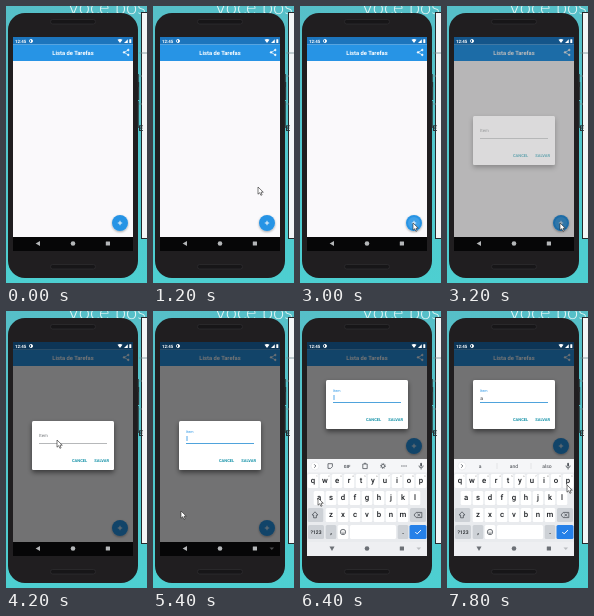
An HTML page for the animation above (8000 ms loop, 141 px wide and 277 px high).

```html
<!DOCTYPE html>
<html lang="pt">
<head>
<meta charset="utf-8">
<title>Lista de Tarefas</title>
<style>
  html, body { margin: 0; width: 100%; height: 100%; overflow: hidden; background: #54c6cd; }
  svg { display: block; width: 100vw; height: 100vh; }
  text { font-family: Roboto, "Noto Sans", sans-serif; text-rendering: geometricPrecision; }
  .mid { text-anchor: middle; }
  .line { fill: none; stroke: #50555b; stroke-width: .8; }
  .action { font-size: 4px; font-weight: 600; fill: #1592a8; }
</style>
</head>
<body>
<svg viewBox="0 0 141 277" preserveAspectRatio="none">
  <defs>
    <linearGradient id="sea" x2="0" y2="1">
      <stop offset="0" stop-color="#56bfc8"/><stop offset="1" stop-color="#4dcfd1"/>
    </linearGradient>
    <filter id="soft" x="-30%" y="-30%" width="160%" height="170%">
      <feDropShadow dx="0" dy="1" stdDeviation="1" flood-opacity=".35"/>
    </filter>
    <filter id="deep" x="-20%" y="-20%" width="140%" height="160%">
      <feDropShadow dx="0" dy="2.5" stdDeviation="2.5" flood-opacity=".5"/>
    </filter>
    <clipPath id="screen"><rect x="7" y="31" width="120" height="214"/></clipPath>
  </defs>

  <!-- Page behind the phone -->
  <rect width="141" height="277" fill="url(#sea)"/>
  <text x="61" y="7.5" font-size="20" font-weight="300" fill="#e4f6f6" style="font-family:Lato,sans-serif">Você poss</text>
  <rect x="135.5" y="6.5" width="8" height="226" fill="#f3f6f7" stroke="#25292c"/>
  <path d="M133 47h8M133 70h3M133 98h3" stroke="#748d94" stroke-width=".8"/>
  <text x="132.5" y="125" font-size="8" font-weight="700" fill="#253035">E</text>
  <path d="M132.5 76v18" stroke="#30383c" stroke-width="1.4"/>

  <!-- Phone body -->
  <rect x="2" y="7" width="130" height="265" rx="17" fill="#201e20"/>
  <path d="M132 68v13M132 95v27" stroke="#25282a" stroke-width="1.4"/>
  <g fill="#171618" stroke="#302e31" stroke-width=".7">
    <rect x="44.5" y="13.5" width="45" height="4.5" rx="2.2"/>
    <rect x="44.5" y="258.5" width="45" height="4.5" rx="2.2"/>
  </g>

  <g clip-path="url(#screen)">
    <rect x="7" y="31" width="120" height="214" fill="#faf9fb"/>
    <rect x="7" y="31" width="120" height="7.5" fill="#1c75bd"/>
    <rect x="7" y="38.5" width="120" height="16.5" fill="#2794e5"/>
    <text class="mid" x="67" y="48.6" font-size="5.8" font-weight="600" fill="#fff">Lista de Tarefas</text>
    <g fill="#fff" stroke="#fff" stroke-width=".7">
      <path d="M122.3 44l-4.2 2.4 4.2 2.5" fill="none"/>
      <circle cx="122.3" cy="44" r=".8"/><circle cx="118" cy="46.4" r=".8"/><circle cx="122.3" cy="48.9" r=".8"/>
    </g>
    <g id="fab">
      <circle cx="114" cy="217" r="8" fill="#2794e5" filter="url(#soft)"/>
      <circle id="ripple" cx="114" cy="217" r="6" fill="#fff" opacity="0"/>
      <path d="M111.8 217h4.4M114 214.8v4.4" stroke="#fff" stroke-width=".9"/>
    </g>

    <rect id="scrim" x="7" y="31" width="120" height="200" fill="#000" opacity="0"/>
    <g fill="#fff">
      <text x="9" y="37" font-size="4.4" font-weight="600">12:45</text>
      <circle cx="25" cy="35" r="1.6" fill="none" stroke="#fff" stroke-width=".8"/>
      <path d="M25 33.4a1.6 1.6 0 0 1 0 3.2zM111.5 33.8q2.5-1.7 5 0l-2.5 3.2zM118 37l3.8-3.8V37z"/>
      <rect x="123.3" y="33.2" width="2" height="3.8" rx=".3"/>
    </g>

    <g id="dialog" opacity="0">
      <rect x="26" y="110" width="82" height="49" rx="1.5" fill="#fff" filter="url(#deep)"/>
      <text id="label" x="33">Item</text>
      <text id="typed" x="33.2" y="129.7" font-size="5" fill="#303236">a</text>
      <path id="caret" d="M34 125v5" stroke="#2794e5" stroke-width=".8"/>
      <path id="rule" d="M33 132.5h68"/>
      <text class="action" x="66" y="150.5">CANCEL</text>
      <text class="action" x="88.3" y="150.5">SALVAR</text>
    </g>

    <rect id="navBar" x="7" y="231" width="120" height="14"/>
    <g id="board">
      <rect x="7" y="148" width="120" height="83" fill="#e9ebee"/>
      <rect x="7" y="148" width="120" height="13.5" fill="#f5f6f8"/>
      <circle cx="15" cy="155" r="4" fill="#fff" stroke="#d9dce0" stroke-width=".4"/>
      <path class="line" d="M14.2 153.3l1.7 1.7-1.7 1.7"/>
      <g id="tools">
        <path class="line" d="M28 152.7h4.4v3l-1.7 1.7H28zM62.8 153h4.4v4.6h-4.4zM64 152.3h2"/>
        <text class="mid" x="47" y="156.7" font-size="4.3" font-weight="700" fill="#50555b">GIF</text>
        <circle class="line" cx="83" cy="155" r="1.6"/>
        <circle class="line" cx="83" cy="155" r="2.5" stroke-dasharray="1 .96"/>
        <path d="M101.3 155h5.5" stroke="#50555b" stroke-width="1.2" stroke-dasharray="1.2 .9"/>
      </g>
      <g id="hints" class="mid" font-size="5" fill="#3e4248">
        <text x="33" y="156.7">a</text><text x="67" y="156.7">and</text><text x="100" y="156.7">also</text>
        <path d="M50 152v6M84 152v6" stroke="#d0d3d7" stroke-width=".5"/>
      </g>
      <rect x="120.2" y="151.8" width="1.8" height="3.8" rx=".9" fill="#50555b"/>
      <path class="line" d="M119 154.5q0 2.3 2.1 2.3t2.1-2.3M121.1 156.8v1.7" stroke-width=".6"/>
      <g id="keys"></g>
      <path class="line" d="M15 200.8l-3 3.2h1.6v2.8h2.8V204H18z"/>
      <path class="line" d="M114 204l2.2-2.6h5.6v5.2h-5.6zM117.4 202.6l2.8 2.8M120.2 202.6l-2.8 2.8" stroke-width=".6"/>
      <circle class="line" cx="43" cy="221" r="2.7" stroke-width=".6"/>
      <path class="line" d="M41.6 221.6q1.4 1.7 2.8 0M42 219.8v.5M44 219.8v.5" stroke-width=".6"/>
      <path d="M115.3 221l1.9 1.9 3.8-3.8" fill="none" stroke="#fff" stroke-width="1"/>
    </g>
    <g id="nav">
      <path id="back" d="M34 235v5l-4.4-2.5z"/>
      <circle cx="67" cy="237.5" r="2.3"/>
      <rect x="99.8" y="235.4" width="4.2" height="4.2" rx=".4"/>
      <path id="switcher" d="M116.5 236.5h4.6l-2.3 2.6z" opacity=".4"/>
    </g>
  </g>

  <path id="cursor" d="M0 0v7.2l1.7-1.5 1.2 2.6 1.2-.5-1.1-2.6h2.3z" fill="#fff" stroke="#222" stroke-width=".6"/>
</svg>
<script>
const $ = id => document.getElementById(id);
const LOOP = 8000, STEP = 200;

// time, x, y of the pointer tip
const path = [
  [800, 127, 105], [1000, 113, 151], [1200, 105, 181], [2000, 105, 181],
  [2800, 113, 217], [3200, 113, 217], [3600, 84, 167], [4000, 50, 123],
  [4200, 51, 129], [4800, 51, 129], [5400, 28, 200], [5800, 28, 200],
  [6400, 18, 187], [6800, 18, 187], [7400, 98, 177], [7800, 120, 174]
];

function pointer(t) {
  const i = path.findIndex(p => p[0] >= t);
  if (i <= 0) return path[0].slice(1);
  const [t0, x0, y0] = path[i - 1], [t1, x1, y1] = path[i];
  const k = (t - t0) / (t1 - t0);
  return [x0 + (x1 - x0) * k, y0 + (y1 - y0) * k];
}

function key(x, y, w, char = '', fill = '#fff', size = 7.8) {
  return `<rect x="${x - w / 2}" y="${y - 7}" width="${w}" height="14" rx="1.5" fill="${fill}"/>` +
    `<text class="mid" x="${x}" y="${y + size * .32}" font-size="${size}" font-weight="500" fill="#1d2024">${char}</text>`;
}

function buildKeys() {
  const row = (chars, x, y) => [...chars].map((c, i) => key(x + 12 * i, y, 10.6, c)).join('');
  const digits = [...'1234567890'].map((d, i) =>
    `<text class="mid" x="${16.8 + 12 * i}" y="166" font-size="2.4" fill="#777">${d}</text>`).join('');
  const gray = '#cdd1d6';
  $('keys').innerHTML = row('qwertyuiop', 13, 170) + digits +
    row('asdfghjkl', 19, 187) + row('zxcvbnm', 31, 204) +
    key(15.5, 204, 15.5, '', gray) + key(118, 204, 16, '', gray) +
    key(16, 221, 16, '?123', gray, 5) + key(31, 221, 10.6, ',', gray) +
    key(43, 221, 10.6) + key(73, 221, 46) + key(103, 221, 10.6, '.', gray) +
    key(118, 221, 17, '', '#2580e8');
}

function set(id, attrs) {
  for (const name in attrs) $(id).setAttribute(name, attrs[name]);
}
const show = (id, on) => set(id, { visibility: on ? 'visible' : 'hidden' });

function draw(t) {
  const fade = t < 3200 ? 0 : t < 3400 ? .5 : 1;
  const focus = t >= 4800, board = t >= 6000, typed = t >= 6600;
  const float = t >= 5000;

  const [x, y] = pointer(t);
  show('cursor', t >= 800);
  set('cursor', { transform: `translate(${x} ${y})` });

  set('ripple', { opacity: t >= 3000 && t < 3400 ? .12 : 0 });
  set('scrim', { opacity: .54 * fade });
  set('dialog', { opacity: fade, transform: `translate(0 ${board ? -41 : 0})` });
  set('fab', { transform: `translate(0 ${board ? -82 : 0})` });

  set('label', {
    y: float ? 122.3 : focus ? 124 : 125.7,
    'font-size': float ? 3.7 : 4.4,
    fill: focus ? '#2794e5' : '#73767a'
  });
  set('rule', { stroke: focus ? '#4fa3dc' : '#85888b', 'stroke-width': focus ? 1 : .6 });
  set('caret', {
    opacity: focus && t % 1000 < 500 ? 1 : 0,
    transform: `translate(${typed ? 2.3 : 0} 0)`
  });
  set('typed', { opacity: typed ? 1 : 0 });

  show('board', board);
  set('tools', { opacity: typed ? 0 : 1 });
  set('hints', { opacity: typed ? 1 : 0 });
  set('navBar', { fill: board ? '#eeeff2' : '#060607' });
  set('nav', { fill: board ? '#6c7076' : '#b4b6b8' });
  set('back', { transform: board ? 'rotate(-90 32 237.5)' : '' });
  show('switcher', focus);
}

function frame(now) {
  draw(Math.floor(now % LOOP / STEP) * STEP);
  requestAnimationFrame(frame);
}

buildKeys();
draw(0);
requestAnimationFrame(frame);
</script>
</body>
</html>
```
